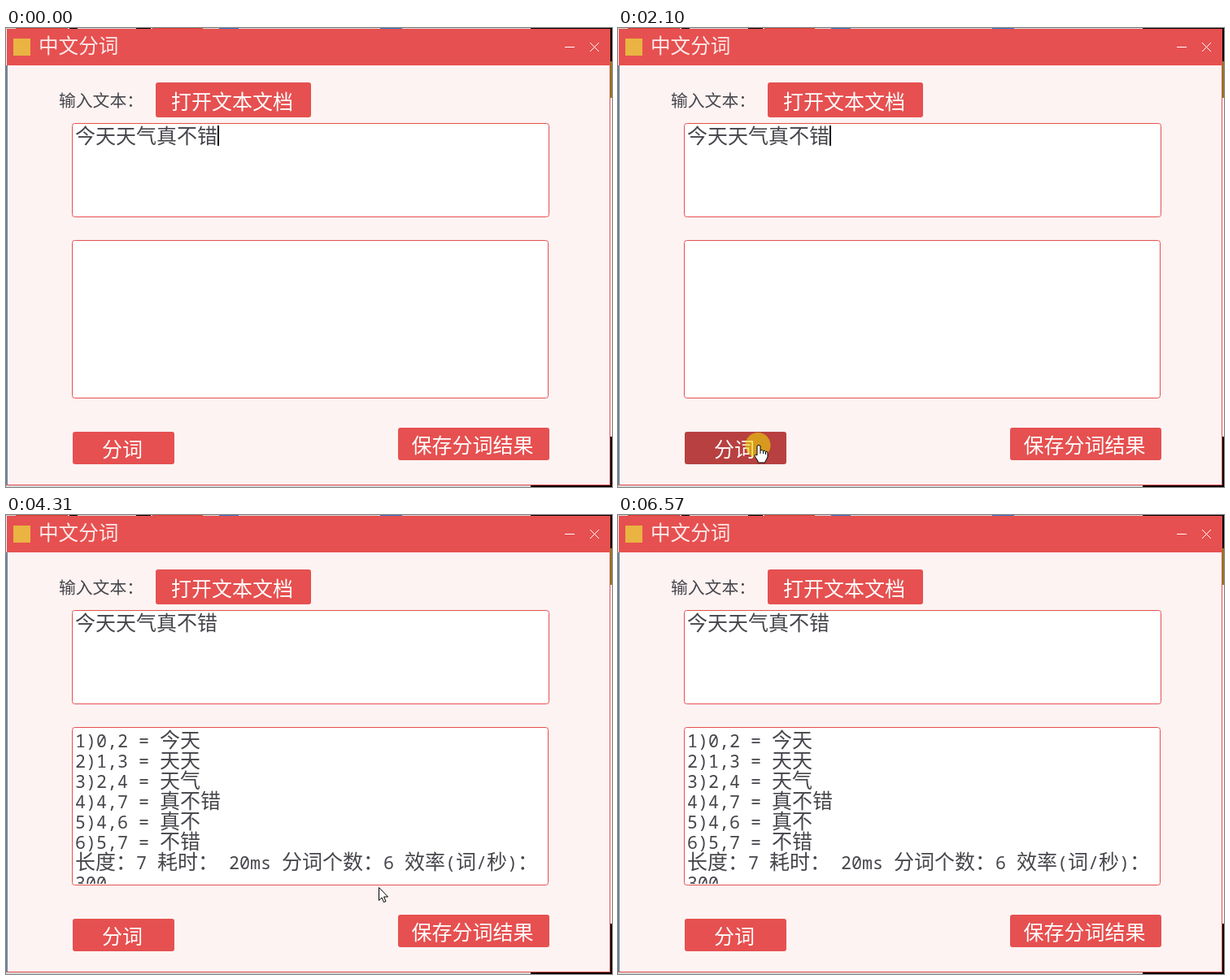
An HTML page that plays this animation: 745x565 px, repeating every 6700 ms.

```html
<!DOCTYPE html>
<html lang="zh-CN">
<meta charset="utf-8">
<title>中文分词</title>
<style>
  html, body { margin: 0; width: 100%; height: 100%; overflow: hidden; background: #fdf3f3; }
  svg { display: block; }
  text { font-family: "Noto Sans CJK SC", "Noto Sans CJK", sans-serif; white-space: pre; }
  .thin { font-weight: 300; }
  .latin { font-family: "Noto Sans Mono", monospace; }
  .box { fill: #fff; stroke: #e65050; }
  .line { fill: none; stroke: #fff; }
</style>
<svg id="stage" width="745" height="565" viewBox="0 0 745 565">
  <!-- slivers of the desktop around the window -->
  <path fill="#d8d8d8" d="M0 0H645V2H0ZM0 562H645V565H0Z"/>
  <path fill="#000" d="M78 0h10v1h-10ZM160 0h18v1h-18ZM645 0H745V41H645ZM743 503H745V565H743ZM645 562H745V565H645Z"/>
  <path fill="#2a78d0" d="M262 0h24v1h-24ZM460 0h27v1h-27Z"/>
  <path fill="#d04030" d="M12 0h64v1h-64ZM180 0h62v1h-62Z"/>
  <path fill="#8a7a1c" d="M743 41H745V86H743Z"/>
  <path fill="#6f8598" d="M0 46H2V563H0Z"/>
  <!-- window -->
  <path fill="#fdf3f3" d="M2 46H742V562H2Z"/>
  <path fill="#e65050" d="M1 1H743V46H1ZM742 46H743V563H742ZM1 562H743V563H1Z"/>
  <rect x="9" y="13" width="21" height="21" fill="#e9b442"/>
  <path class="line" d="M687 23.5H699M718 18L729 29M729 18L718 29"/>
  <rect class="box" x="81.5" y="117.5" width="586" height="115" rx="3"/>
  <rect class="box" x="81.5" y="261.5" width="585" height="194" rx="3"/>
  <clipPath id="clip"><rect x="82" y="262" width="584" height="192"/></clipPath>
  <g id="labels"></g>
  <g id="result" clip-path="url(#clip)"></g>
  <rect id="caret" x="260" y="120" width="2" height="25"/>
  <circle id="click" cx="172" cy="513.5" r="15.5" fill="rgba(237,214,10,.6)"/>
  <g id="pointer" fill="#fff" stroke="#000">
    <path d="M.5.5V16.5L4 13L6.5 18.5L9 17.5L6.5 12H11.5Z"/>
    <path d="M-2 13V2Q-2 .5 0 .5T2 2V7Q4 5.5 5.5 7.5Q8 6.5 8.5 8.5Q11 8 11 10V15L8 21V22H-1V20L-5 14Q-5 11-2 13ZM2 7V11M5.5 8V11M8.5 9V12"/>
    <path fill="none" d="M-3.5-7.5H-.5M.5-7.5H3.5M0-7V8M-3.5 8.5H-.5M.5 8.5H3.5"/>
  </g>
</svg>
<script>
const LOOP = 6700, STEP = 66.6, PRESS = 2100, RELEASE = 2250, DONE = 2870;
const $ = id => document.getElementById(id);

function make(parent, tag, attrs, content = '') {
  const el = document.createElementNS('http://www.w3.org/2000/svg', tag);
  for (const key in attrs) el.setAttribute(key, attrs[key]);
  el.textContent = content;
  return parent.appendChild(el);
}

// Latin runs are set in a monospaced face about half as wide as the Chinese.
function write(parent, str, x, y, size = 25, fill = '#46464c') {
  const line = make(parent, 'text', { class: 'thin', x, y, 'font-size': size, fill });
  for (const run of str.match(/[ -~]+|[^ -~]+/g)) {
    make(line, 'tspan', run < '\x7f' ? { class: 'latin', 'font-size': size * 0.867 } : {}, run);
  }
}

function button(str, x, y, w, h) {
  const rect = make($('labels'), 'rect', { x, y, width: w, height: h, rx: 3, fill: '#e65050' });
  make($('labels'), 'text', {
    x: x + w / 2 - 1.5, y: y + h / 2 + 11, 'text-anchor': 'middle', 'font-size': 25, fill: '#fff'
  }, str);
  return { rect, x, y, w, h };
}

write($('labels'), '中文分词', 40, 31, 24.6, '#fdeaea');
write($('labels'), '输入文本：', 65, 96.5, 20.8);
write($('labels'), '今天天气真不错', 85, 141.5);
button('打开文本文档', 184, 67, 191, 43);
const cut = button('分词', 82, 497, 125, 40);
const save = button('保存分词结果', 482, 492, 186, 40);

const input = '今天天气真不错';
const spans = ['0,2', '1,3', '2,4', '4,7', '4,6', '5,7'];
const report = spans.map((s, i) => `${i + 1})${s} = ${input.slice(...s.split(','))}`);
report.push(`长度：${input.length} 耗时： 20ms 分词个数：${spans.length} 效率(词/秒)：`, '300');
report.forEach((str, i) => write($('result'), str, 85, 286 + 25 * i));

// Each move runs from the last resting place along an arc; bend is its sideways pull.
const linear = k => k, easeIn = k => k ** 3, easeOut = k => 1 - (1 - k) ** 4;
const entry = [645, 562];
const moves = [
  { at: 260, to: [324, 372], bend: -0.3 },
  { at: 950, to: [173, 513], bend: 0.09, ease: easeOut },
  { at: 2450, to: [257, 476], ease: easeOut },
  { at: 3140, to: [294, 380], bend: 0.15 },
  { at: 4030, to: [656, 379], bend: 0.44 },
  { at: 4720, to: [716, 154], bend: 0.11, ease: easeIn },
  { at: 5400, to: [720, 34], time: 270 },
  { at: 5880, to: [661, 566], time: 270 }
];

function pointerAt(t) {
  const i = moves.findLastIndex(m => m.at <= t);
  const { at, to: [x1, y1], bend = 0, time = 590, ease = linear } = moves[i];
  const [x0, y0] = i ? moves[i - 1].to : entry;
  const elapsed = Math.floor((t - at) / STEP) * STEP;
  const k = ease(Math.min(1, elapsed / time));
  const pull = 2 * k * (1 - k) * bend, dx = x1 - x0, dy = y1 - y0;
  return [x0 + dx * k - dy * pull, y0 + dy * k + dx * pull].map(Math.round);
}

const inside = (px, py, { x, y, w, h }) => px >= x && px < x + w && py >= y && py < y + h;
const fields = [{ x: 81, y: 117, w: 587, h: 116 }, { x: 81, y: 261, w: 586, h: 195 }];
const show = (el, on) => { el.style.display = on ? '' : 'none'; };

function draw(t) {
  const visible = t >= moves[0].at;
  const [x, y] = visible ? pointerAt(t) : entry;
  const busy = t >= PRESS && t < DONE;
  const overCut = inside(x, y, cut), overSave = inside(x, y, save);
  const shape = busy || overCut || overSave ? 1 : fields.some(f => inside(x, y, f)) ? 2 : 0;

  $('pointer').setAttribute('transform', `translate(${x} ${y})`);
  [...$('pointer').children].forEach((el, i) => show(el, i === shape));
  cut.rect.setAttribute('fill', busy ? '#b84040' : overCut ? '#eb7373' : '#e65050');
  save.rect.setAttribute('fill', overSave ? '#eb7373' : '#e65050');
  show($('pointer'), visible);
  show($('caret'), t < 470 || busy);
  show($('click'), t >= PRESS && t < RELEASE);
  show($('result'), t >= DONE);
}

const begin = performance.now();
function tick() {
  draw((performance.now() - begin) % LOOP);
  requestAnimationFrame(tick);
}
tick();
</script>
</html>
```
